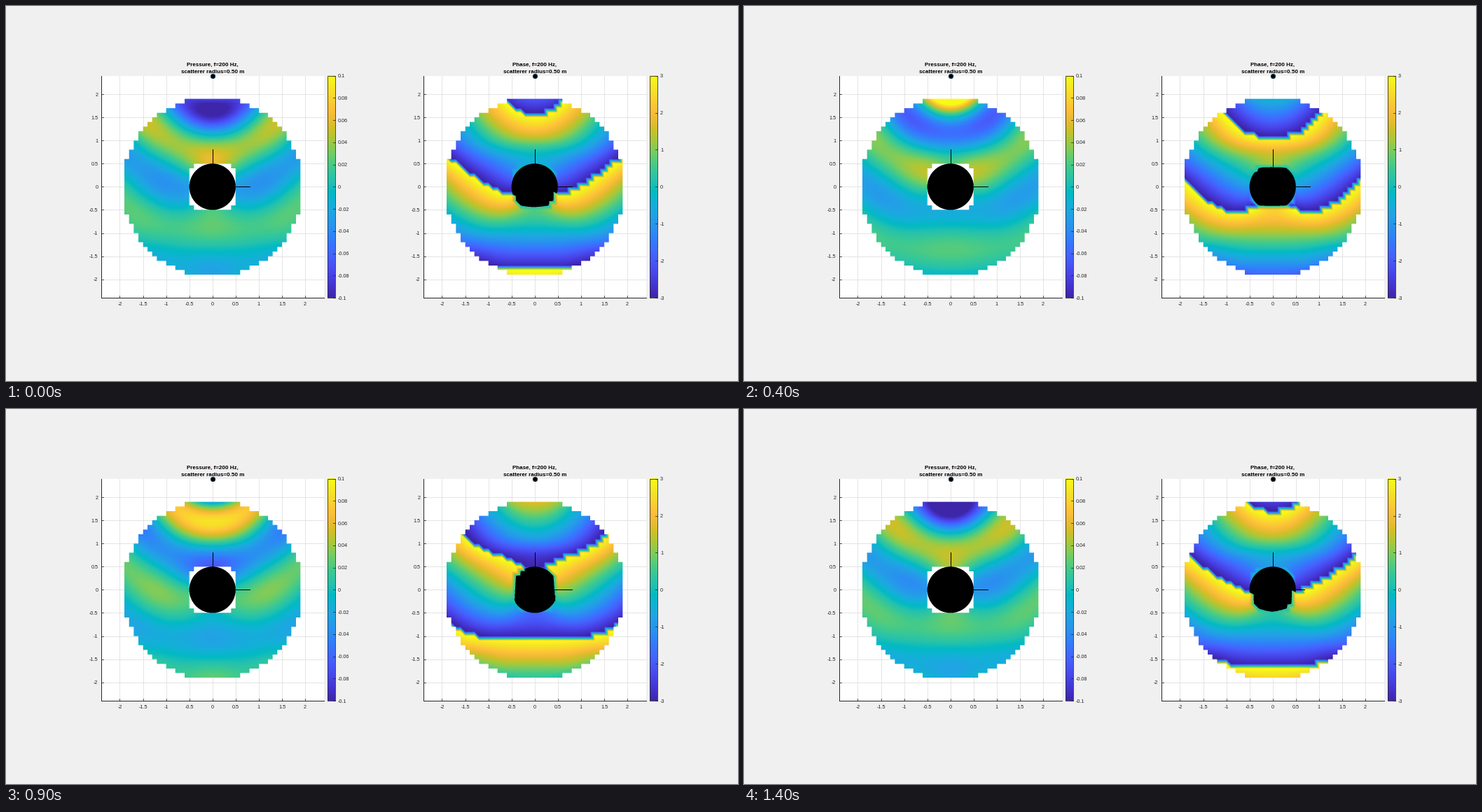
Animation of 1045x536 px, one loop 1.5 s. Source, as a matplotlib script:

```python
import numpy as np
import matplotlib.pyplot as plt
from matplotlib.animation import FuncAnimation
from matplotlib.colors import LinearSegmentedColormap
from matplotlib.patches import Circle, Rectangle

W, H, DPI = 1045, 536, 100
FRAMES, INTERVAL = 15, 100
PX = 72 / DPI                       # points per pixel
INK = "#262626"
plt.rcParams["font.family"] = "Liberation Sans"

CMAP = LinearSegmentedColormap.from_list("sea_sun", [
    "#3E26A8", "#4332CB", "#4741E5", "#4852F4", "#4563FD", "#3875FE",
    "#2E87F7", "#2797EB", "#20A5E3", "#12B1D6", "#02BAC3", "#24C1AE",
    "#37C897", "#57CC7A", "#81CC59", "#ABC739", "#D1BF27", "#F0BA36",
    "#FEC338", "#FAD62D", "#F5E924", "#F9FB15"], N=256)

# Acoustics: point source in front of a rigid sphere
RADIUS, SOURCE = 0.5, 2.4
K = 2 * np.pi * 200 / 343
ORDER = int(np.ceil(K * SOURCE))
REACH, STEP = 2.0, 0.1

# Layout in pixels
SCALE, HALF, MID_Y = 66.16, 158.8, 258.4
MID_X = (294.75, 754.75)
SURF = 130                          # half size of the rendered square
SAMPLES = 3
ARROW, ARROW_Z = 0.8, 2.0


def bessel_pair(x):
    """Spherical Bessel functions j and y for orders 0..ORDER+1."""
    s, c = np.sin(x), np.cos(x)
    j, y = [s / x, s / x**2 - c / x], [-c / x, -c / x**2 - s / x]
    for n in range(1, ORDER + 1):
        for f in (j, y):
            f.append((2 * n + 1) / x * f[n] - f[n - 1])
    return np.array(j), np.array(y)


def slope(f, n, x):
    return n / x * f[n] - f[n + 1]


def sound_field(x, y):
    r = np.maximum(np.hypot(x, y), RADIUS)
    cosine = np.clip(y / r, -1, 1)
    j, yy = bessel_pair(K * r)
    h = j - 1j * yy
    ja, ya = bessel_pair(K * RADIUS)
    ha = ja - 1j * ya
    js, ys = bessel_pair(K * SOURCE)
    hs = js - 1j * ys
    total = np.zeros(r.shape, complex)
    for n in range(ORDER + 1):
        echo = slope(ja, n, K * RADIUS) / slope(ha, n, K * RADIUS)
        legendre = np.polynomial.legendre.legval(cosine, [0] * n + [1])
        total += (2 * n + 1) * legendre * hs[n] * (j[n] - echo * h[n])
    return -1j * K / (4 * np.pi) * total


nodes = np.linspace(-REACH, REACH, 41)
GX, GY = np.meshgrid(nodes, nodes)
DIST = np.hypot(GX, GY)
FIELD = sound_field(GX, GY)
# The four poles of the ball count as outside
INSIDE = (DIST < RADIUS + 1e-9) & (np.maximum(abs(GX), abs(GY)) < RADIUS - 1e-9)
OUTSIDE = DIST > REACH + 1e-9


def interpolate(grid, x, y):
    """Linear on triangles; a cell with any missing corner stays empty."""
    u, v = (x + REACH) / STEP, (y + REACH) / STEP
    i = np.clip(np.floor(u).astype(int), 0, 39)
    k = np.clip(np.floor(v).astype(int), 0, 39)
    u, v = u - i, v - k
    a, b, c, d = grid[k, i], grid[k, i + 1], grid[k + 1, i], grid[k + 1, i + 1]
    low = a * (1 - u - v) + b * u + c * v
    high = d * (u + v - 1) + c * (1 - u) + b * (1 - v)
    value = np.where(u + v < 1, low, high)
    return np.where(np.isnan(a + b + c + d), np.nan, value)


def sample_points(mid_x):
    left, top = round(mid_x) - SURF, round(MID_Y) - SURF
    steps = (np.arange(2 * SURF * SAMPLES) + 0.5) / SAMPLES
    x, y = np.meshgrid((left + steps - mid_x) / SCALE,
                       (MID_Y - top - steps) / SCALE)
    return x, y, (left, left + 2 * SURF, top + 2 * SURF, top)


def render(grid, x, y, limit):
    """Surface seen from above, with the black ball hiding what lies below it."""
    z = interpolate(grid, x, y)
    rgba = CMAP(np.nan_to_num(np.clip((z + limit) / (2 * limit), 0, 1)))
    rgba[np.isnan(z)] = 0
    room = RADIUS**2 - x**2 - y**2
    ball = (room > 0) & (np.isnan(z) | (np.sqrt(np.maximum(room, 0)) > z))
    rgba[ball] = (0, 0, 0, 1)
    n = 2 * SURF
    mean = rgba.reshape(n, SAMPLES, n, SAMPLES, 4).mean(axis=(1, 3))
    mean[..., :3] /= np.maximum(mean[..., 3:], 1e-6)
    return np.clip(mean, 0, 1)


fig = plt.figure(figsize=(W / DPI, H / DPI), dpi=DPI, facecolor="#f0f0f0")
ax = fig.add_axes([0, 0, 1, 1])


def line(xs, ys, color=INK, width=0.8, z=3, **kw):
    return ax.plot(xs, ys, color=color, lw=width * PX, zorder=z, **kw)[0]


def label(x, y, text, size=7.3, **kw):
    kw = {"color": INK, "va": "center_baseline", "zorder": 6, **kw}
    ax.text(x, y, text, fontsize=size * PX, **kw)


def draw_axes(mid_x, name):
    left, right = mid_x - HALF, mid_x + HALF
    top, bottom = MID_Y - HALF, MID_Y + HALF
    ax.add_patch(Rectangle((left, top), 2 * HALF, 2 * HALF, fc="white", zorder=0))
    for v in np.arange(-2, 2.5, 0.5):
        x, y = mid_x + v * SCALE, MID_Y - v * SCALE
        line([x, x], [top, bottom], "#dedede", z=1)
        line([left, right], [y, y], "#dedede", z=1)
        line([x, x], [bottom, bottom - 3])
        line([left, left + 3], [y, y])
        label(x, bottom + 8.3, f"{v:g}", ha="center")
        label(left - 4.5, y, f"{v:g}", ha="right")
    line([left, left], [top, bottom], width=1)
    line([left, right], [bottom, bottom], width=1)
    title = dict(ha="center", va="baseline", weight="bold", color="black")
    label(mid_x, 85.7, f"{name}, f=200 Hz,", 8.04, **title)
    label(mid_x, 95.7, "scatterer radius=0.50 m", 8.04, **title)
    ax.plot(mid_x, top + 0.3, "o", ms=6.4 * PX, mfc="black", mec="#0b3a5e",
            mew=0.9 * PX, zorder=8)


def draw_colorbar(x, limit, ticks):
    top, bottom = MID_Y - HALF, MID_Y + HALF
    ax.imshow(np.linspace(1, 0, 256)[:, None], cmap=CMAP, aspect="auto",
              extent=(x, x + 11, bottom, top), interpolation="nearest", zorder=2)
    ax.add_patch(Rectangle((x, top), 11, 2 * HALF, fill=False, ec=INK,
                           lw=0.8 * PX, zorder=3))
    for v in ticks:
        y = MID_Y - v / limit * HALF
        line([x + 8, x + 11], [y, y])
        label(x + 14.5, y, f"{v:g}", ha="left")


def draw_toolbar():
    """Hover toolbar: brush, data tip, rotate, pan, zoom in, zoom out, home."""
    gray, y, parts = "#7a7a7a", 91, []

    def stroke(xs, ys, width=1.0):
        parts.append(line(xs, ys, gray, width, z=7))

    def ring(x, cy, r):
        parts.append(ax.add_patch(Circle((x, cy), r, fill=False, ec=gray,
                                         lw=PX, zorder=7)))

    stroke([364.5, 359], [85.5, 91.5], 1.6)
    stroke([359.5, 356.5, 354], [91, 94.5, 96.5], 2.6)
    stroke([370, 379.5, 379.5, 370, 370], [86.5, 86.5, 96, 96, 86.5])
    for dy in (-2, 1.5):
        stroke([372.5, 377], [y + dy, y + dy])
    stroke([367.8, 370], [91.2, 91.2])
    ring(388.3, y, 5.3)
    stroke([388.3, 391, 391, 388.3, 385.6, 385.6, 388.3, 388.3],
           [88, 89.5, 92.5, 94, 92.5, 89.5, 88, 94])
    stroke([385.6, 388.3, 391], [89.5, 91, 89.5])
    stroke([400.5, 398, 397.5, 399, 400, 399.5, 400.8, 401.8, 402, 403.3, 404,
            405.3, 406, 407.5, 408, 407.5, 406.5, 401.5, 400.5],
           [95, 92, 90.5, 90.5, 91.5, 87, 86.8, 90.5, 85.8, 85.6, 90.3, 86.3,
            90.7, 88, 88.6, 92.5, 96.5, 96.5, 95])
    for x, plus in ((416.7, True), (431.2, False)):
        ring(x, 90.3, 4.3)
        stroke([x - 2.2, x + 2.2], [90.3, 90.3])
        if plus:
            stroke([x, x], [88.1, 92.5])
        stroke([x + 3.1, x + 6], [93.4, 96.4], 1.5)
    stroke([440.5, 446.5, 452.5], [91.5, 85.8, 91.5])
    stroke([442.2, 442.2, 445, 445, 448, 448, 450.8, 450.8],
           [90.5, 96.5, 96.5, 92.7, 92.7, 96.5, 96.5, 90.5])
    return parts


draw_axes(MID_X[0], "Pressure")
draw_axes(MID_X[1], "Phase")
draw_colorbar(459.4, 0.1, np.round(np.arange(-5, 6) * 0.02, 2))
draw_colorbar(919.4, 3, range(-3, 4))
toolbar = draw_toolbar()

views = [sample_points(m) for m in MID_X]
images = [ax.imshow(np.zeros((2, 2, 4)), extent=v[2], aspect="auto",
                    interpolation="nearest", zorder=4) for v in views]

# The arrows lie in full view over the pressure surface
reach = np.linspace(RADIUS - 0.1, ARROW, 120)
zero = np.zeros_like(reach)
line(MID_X[0] + zero, MID_Y - reach * SCALE, "black", 1, 5)
line(MID_X[0] + reach * SCALE, MID_Y + zero, "black", 1, 5)
up_line = line([], [], "black", 1, 5)
side_line = line([], [], "black", 1, 5)

ax.set_xlim(0, W)
ax.set_ylim(H, 0)
ax.axis("off")


def update(frame):
    wave = FIELD * np.exp(2j * np.pi * frame / FRAMES)
    pressure = np.where(INSIDE | OUTSIDE, np.nan, wave.real)
    phase = np.where(INSIDE, 0, np.angle(wave))
    phase[OUTSIDE] = np.nan
    for image, (x, y, _), grid, limit in zip(images, views, (pressure, phase), (0.1, 3)):
        image.set_data(render(grid, x, y, limit))

    # They vanish where the phase surface rises past them
    up = np.where(interpolate(phase, zero, reach) < ARROW_Z, reach, np.nan)
    side = np.where(interpolate(phase, reach, zero) < ARROW_Z, reach, np.nan)
    up_line.set_data(zero + MID_X[1], MID_Y - up * SCALE)
    side_line.set_data(MID_X[1] + side * SCALE, zero + MID_Y)

    for part in toolbar:
        part.set_visible(frame in (11, 12))
    return [*images, up_line, side_line, *toolbar]


anim = FuncAnimation(fig, update, frames=FRAMES, interval=INTERVAL,
                     repeat=True, repeat_delay=0, blit=False)
plt.show()
```
